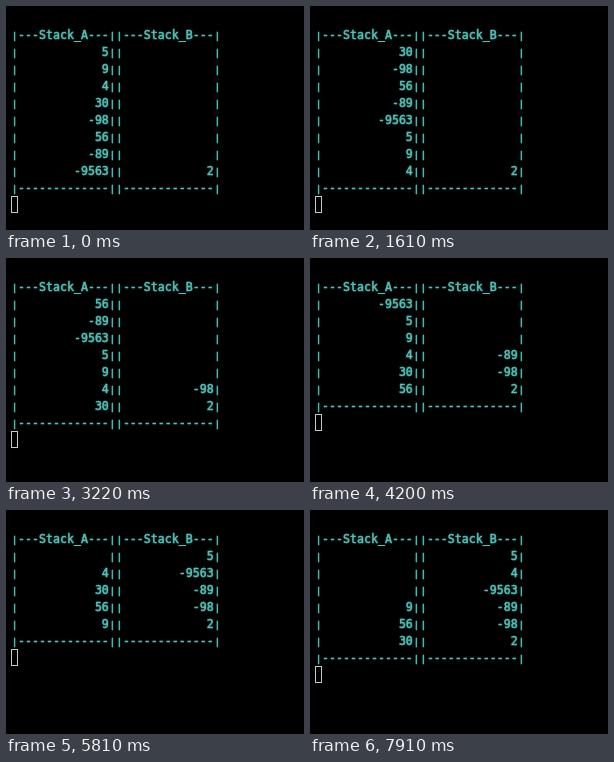
Animation of 298 by 224 pixels, one loop 8000 ms. Source, as an HTML page:

```html
<!DOCTYPE html>
<html lang="en">
<head>
<meta charset="utf-8">
<title>Stack sort</title>
<style>
html, body { margin: 0; width: 100%; height: 100%; overflow: hidden; background: #000; }
pre {
  position: absolute; left: 5px; top: 21px; margin: 0;
  font: 11.627px/17px "DejaVu Sans Mono", monospace;
  color: #55c2b8; -webkit-text-stroke: .45px;
  text-shadow: 0 0 2px #2c7f80;
}
/* Bars are shorter than the font's own glyph */
pre i {
  display: inline-block; width: 7px; height: 17px; vertical-align: top;
  font-style: normal; font-size: 9.5px; text-align: center;
}
#cursor {
  position: absolute; left: 5px; width: 7px; height: 17px;
  box-sizing: border-box; border: 1px solid #c8c8c8;
}
</style>
</head>
<body>
<pre id="screen"></pre>
<div id="cursor"></div>
<script>
const LOOP = 8000, LINE = 17, TOP = 20;
const startA = [5, 9, 4, 30, -98, 56, -89, -9563], startB = [2];
const steps = [
  [350, 'ra'], [980, 'ra'], [1540, 'ra'], [2170, 'ra'], [2800, 'pb'],
  [3360, 'ra'], [4060, 'pb'], [4620, 'pb'], [5250, 'pb'], [5810, 'ra'],
  [6370, 'pb'], [6930, 'ra'], [7560, 'ss']
];
const swap = s => s.unshift(...s.splice(0, 2).reverse());
const ops = {
  ra: a => a.push(a.shift()),
  pb: (a, b) => b.unshift(a.shift()),
  ss: (a, b) => { swap(a); swap(b); }
};
const screen = document.getElementById('screen');
const cursor = document.getElementById('cursor');
const row = (l, r) => `|${l}||${r}|`;
let shown;

function draw(t) {
  const a = [...startA], b = [...startB];
  for (const [at, op] of steps) if (t >= at) ops[op](a, b);

  // Both stacks rest on the bottom row
  const height = Math.max(a.length, b.length);
  const cell = (s, i) => String(s[i - height + s.length] ?? '').padStart(13);
  const lines = [row('---Stack_A---', '---Stack_B---')];
  for (let i = 0; i < height; i++) lines.push(row(cell(a, i), cell(b, i)));
  const rule = '-'.repeat(13);
  lines.push(row(rule, rule));

  const text = lines.join('\n');
  if (text === shown) return;
  shown = text;
  screen.innerHTML = text.replaceAll('|', '<i>|</i>');
  cursor.style.top = TOP + lines.length * LINE + 'px';
}

const start = performance.now();
function tick() {
  draw((performance.now() - start) % LOOP);
  requestAnimationFrame(tick);
}
tick();
</script>
</body>
</html>
```
